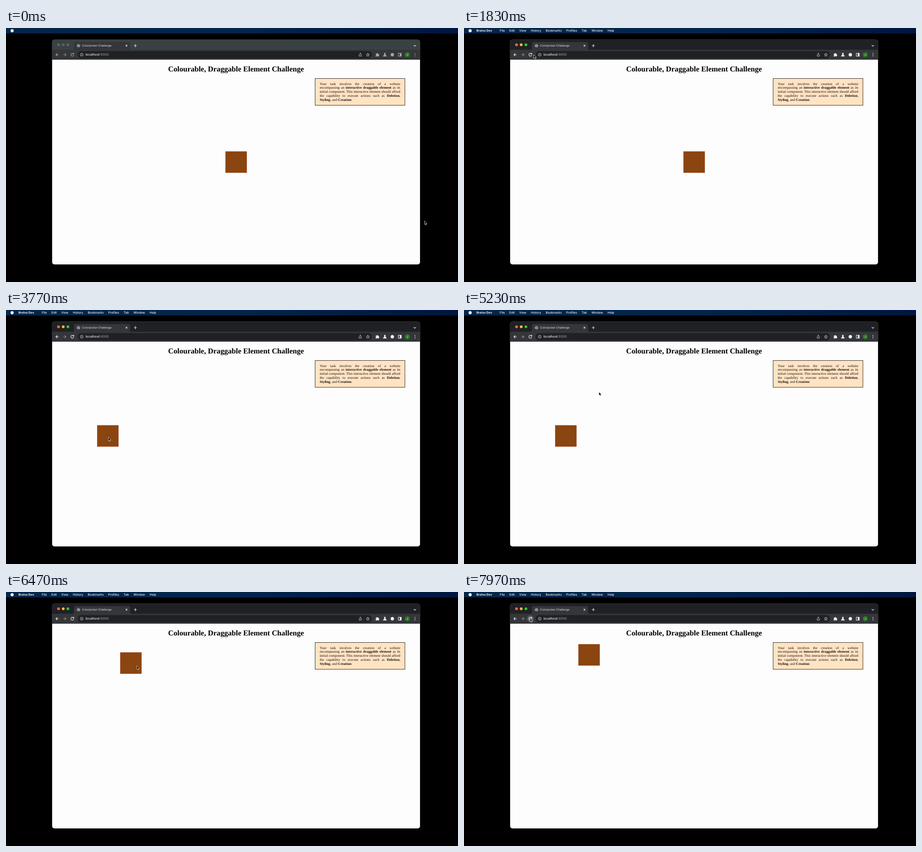
Animation, 998 px wide and 561 px high, one loop 8 s. Source, as an HTML page:

```html
<!DOCTYPE html>
<html lang="en">
<head>
<meta charset="utf-8">
<title>Colorpicker Challenge</title>
<style>
  html, body { margin: 0; width: 100%; height: 100%; overflow: hidden; background: #000; }
  body { text-rendering: geometricPrecision; }
  svg { position: absolute; left: 0; top: 0; }
  .ui { font-family: Inter, "Open Sans", sans-serif; }
  .line { fill: none; stroke: currentColor; stroke-width: 1.1; }
  #menu { font-size: 6.6px; line-height: 12px; font-weight: 500; color: #f4f6f8; }
  #menu > * { position: absolute; top: 0; white-space: nowrap; }
  #menu b { left: 27.5px; }
  #menu div { left: 79px; display: flex; gap: 10px; }
  #heading { font: bold 16.62px "Liberation Serif", serif; text-anchor: middle; }
  /* The page is laid out at full size and shown at about half scale. */
  #task {
    position: absolute; left: 682px; top: 111px; width: 384px; height: 116px;
    transform: scale(.519); transform-origin: 0 0; box-sizing: border-box;
    padding: 14px 18.5px 0; border: 2px solid #3a322b; background: #ffe4c4;
    color: #100c08; font: 15px/17px "Liberation Serif", serif;
  }
  #task div { white-space: nowrap; text-align: justify; text-align-last: justify; }
  #task div:last-child { text-align-last: left; }
</style>
</head>
<body>
<svg width="998" height="561" viewBox="0 0 998 561">
  <defs>
    <linearGradient id="sky">
      <stop offset="0" stop-color="#04264a"/>
      <stop offset=".5" stop-color="#03264c"/>
      <stop offset="1" stop-color="#001640"/>
    </linearGradient>
    <clipPath id="frame"><rect x="102" y="26" width="812" height="496" rx="5"/></clipPath>
  </defs>
  <rect width="998" height="12" fill="url(#sky)"/>
  <circle cx="13.5" cy="6" r="3.4" fill="#fff"/>

  <rect x="101.6" y="25.6" width="812.8" height="496.8" rx="5.4" fill="#5c5e61"/>
  <g clip-path="url(#frame)">
    <rect id="strip" x="102" y="26" width="812" height="23"/>
    <path d="M146 48.5Q150 48 150 44V35Q150 31 154 31H270Q274 31 274 35V44Q274 48 278 48.5Z" fill="#35363a"/>
    <rect x="102" y="48" width="812" height="22" fill="#35363a"/>
    <rect x="158" y="51" width="650" height="16" rx="8" fill="#202124"/>
    <rect x="102" y="70" width="812" height="453" fill="#fdfdfd"/>
  </g>

  <g id="lights"></g>
  <g class="ui" fill="#e8eaed">
    <text x="168" y="41.2" font-size="6.2">Colorpicker Challenge</text>
    <text x="175.5" y="61.4" font-size="7.2" font-weight="500">localhost<tspan fill="#9aa0a6" font-weight="400">:8000</tspan></text>
  </g>
  <g id="favicon">
    <circle cx="160" cy="39" r="3.6" fill="#a9adb1"/>
    <path d="M157 37.2q2 .2 2.4 1.6t2 1.2M160.4 36.2q0 1.2 2.4 1.4M158 41.2q1.2-.8 2 .6" fill="none" stroke="#35363a"/>
  </g>
  <circle id="spinner" cx="160" cy="39" r="3.3" fill="none" stroke="#9aa0a6" stroke-dasharray="13 8"/>
  <g class="line" color="#e3e5e8">
    <path d="M264.2 37.2l3.6 3.6m0-3.6l-3.6 3.6"/>
    <path d="M285.6 35.8v6.4m-3.2-3.2h6.4M900.2 37.8l2.5 2.5 2.5-2.5" stroke-width="1.2"/>
    <path d="M779.8 58.2v4h5v-4M782.3 60.2v-5m-1.6 1.5l1.6-1.6 1.6 1.6" stroke-width=".8"/>
    <path d="M799 55.5l1 2.4 2.5.2-1.9 1.7.6 2.5-2.2-1.4-2.2 1.4.6-2.5-1.9-1.7 2.5-.2Z" stroke-width=".8"/>
    <circle cx="167.2" cy="59" r="3.2" stroke-width=".8"/>
    <path d="M167.2 58.5v2.2m0-3.6v.8" stroke-width=".9"/>
  </g>

  <circle id="hover" cx="146.5" cy="59" r="7.5" fill="#56575b"/>
  <g id="tools">
    <g class="line">
      <path d="M116.4 59h-6.2m2.9-3l-3 3 3 3"/>
      <path d="M126.3 59h6.2m-2.9-3l3 3-3 3" stroke="#8b8e93"/>
      <path id="reload" d="M149.1 57.2a3.2 3.2 0 1 0 .5 2.5M149.7 55v2.8h-2.8"/>
      <path id="stop" d="M143.8 56.3l5.4 5.4m0-5.4l-5.4 5.4"/>
      <rect x="866.2" y="55.8" width="6.6" height="6.4"/>
    </g>
    <g fill="currentColor">
      <path d="M816.3 56.7h2a1.3 1.3 0 1 1 2.6 0h2v2a1.3 1.3 0 1 1 0 2.6v1.6h-2.2a1.1 1.1 0 0 0-2.2 0h-2.2v-2.2a1.1 1.1 0 0 0 0-2.2Z"/>
      <path d="M834.6 55h3.8v1h-.6v2.2l2.6 3.7q.2.9-.7.9h-6.4q-.9 0-.7-.9l2.6-3.7V56h-.6Z"/>
      <circle cx="853" cy="59" r="3.7"/>
      <rect x="869.6" y="55.8" width="3.2" height="6.4"/>
    </g>
    <path d="M903 56.2v6" stroke="currentColor" stroke-width="1.7" stroke-linecap="round" stroke-dasharray="0 2.8"/>
  </g>
  <circle cx="886" cy="59" r="5.6" fill="#2b7a22"/>
  <text class="ui" x="886" y="61.3" font-size="6.4" fill="#fff" text-anchor="middle">J</text>

  <text id="heading" x="508" y="96">Colourable, Draggable Element Challenge</text>
  <rect id="box" x=".3" y=".3" width="46.9" height="46.9" fill="#8a4510" stroke="#b0502c" stroke-width=".6"/>
</svg>

<div id="menu" class="ui">
  <b>Brelvo Dev</b>
  <div><span>File</span><span>Edit</span><span>View</span><span>History</span><span>Bookmarks</span><span>Profiles</span><span>Tab</span><span>Window</span><span>Help</span></div>
</div>

<div id="task">
  <div>Your task involves the creation of a website</div>
  <div>encompassing an <b>interactive draggable element</b> as its</div>
  <div>initial component. This interactive element should afford</div>
  <div>the capability to execute actions such as <b>Deletion</b>,</div>
  <div><b>Styling</b>, and <b>Creation</b>:</div>
</div>

<svg width="998" height="561" viewBox="0 0 998 561">
  <path id="cursor" d="M0 0V8L1.8 6.4 3 9.2 4.4 8.6 3.2 5.9H5.7Z" fill="#000" stroke="#fff" stroke-width=".7"/>
</svg>

<script>
const LOOP = 8000, LOAD_TIME = 120, DRAG_LAG = 16;
const $ = id => document.getElementById(id);
const show = (id, on) => $(id).style.display = on ? "" : "none";
const place = (id, [x, y]) => $(id).setAttribute("transform", `translate(${x} ${y})`);

const lightColors = ["#ff5f57", "#febc2e", "#28c840"];
$("lights").innerHTML = lightColors.map((c, i) => `<circle cx="${116 + 10.35 * i}" cy="37" r="3.1"/>`).join("");

const start = [924, 426], reloadButton = [146, 58], home = [484.5, 272.5];

const moves = [
  { from: 30, until: 1640, to: [154, 59] },
  { from: 1880, until: 2000, to: reloadButton },
  { from: 2570, until: 2960, to: [594, 337] },
  { from: 2960, until: 3240, to: [509.5, 299] },
  { from: 3260, until: 3700, to: [226, 281] },
  { from: 3870, until: 4200, to: reloadButton },
  { from: 4990, until: 5230, to: [298, 181] },
  { from: 5230, until: 5720, to: [238, 284.5] },
  { from: 5840, until: 6470, to: [289, 163] },
  { from: 6470, until: 6640, to: [289.5, 145] },
  { from: 6900, until: 7400, to: reloadButton }
];
const drags = [
  { from: 3260, until: 3720, grip: [25, 26.5] },
  { from: 5840, until: 6700, grip: [37, 30] }
];
const loads = [2080, 4970, 7640];

function ease(u) {
  u = Math.min(1, Math.max(0, u));
  return u * u * (3 - 2 * u);
}

function cursorAt(t) {
  return moves.reduce((pos, { from, until, to }) => {
    const k = ease((t - from) / (until - from));
    return pos.map((v, i) => v + (to[i] - v) * k);
  }, start);
}

// The box trails the cursor during a drag and stays where it was dropped.
function boxAt(t) {
  const drag = drags.findLast(d => t >= d.from);
  if (!drag) return home;
  return cursorAt(Math.min(t, drag.until) - DRAG_LAG).map((v, i) => v - drag.grip[i]);
}

function draw(t) {
  const focused = t >= 780, toolsLit = t >= 870;
  const loading = loads.some(s => t >= s && t < s + LOAD_TIME);
  const cursor = cursorAt(t);

  show("menu", focused);
  $("strip").setAttribute("fill", focused ? "#202124" : "#3a4143");
  $("tools").setAttribute("color", toolsLit ? "#f1f3f4" : "#a4a8ac");
  [...$("lights").children].forEach((dot, i) => dot.setAttribute("fill", toolsLit ? lightColors[i] : "#5d6365"));

  show("hover", Math.hypot(cursor[0] - 146.5, cursor[1] - 59) < 7);
  show("reload", !loading);
  show("stop", loading);
  show("favicon", !loading);
  show("spinner", loading);
  $("spinner").setAttribute("transform", `rotate(${-t * .4} 160 39)`);

  // The second reload briefly shows the box at its default place.
  const resetting = t >= 5000 && t < 5040;
  place("box", resetting ? home : boxAt(t));
  place("cursor", cursor);
}

function tick() {
  draw(performance.now() % LOOP);
  requestAnimationFrame(tick);
}
tick();
</script>
</body>
</html>
```
